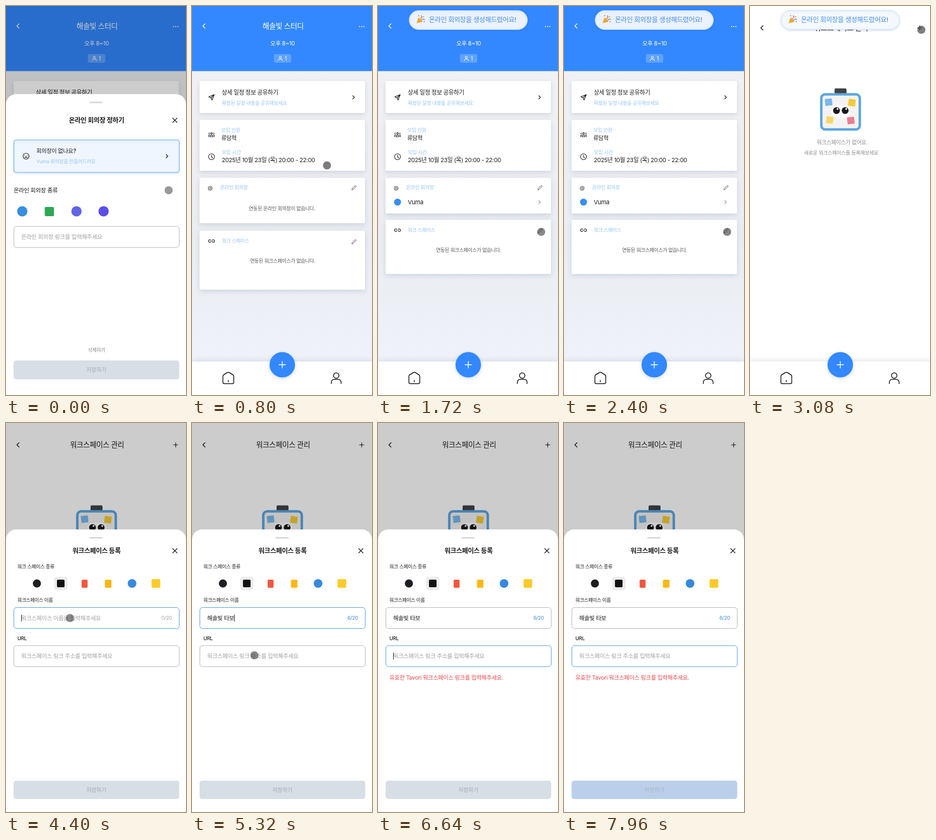
Recreate the animation shown at these times as an HTML page with a canvas. Size 332 by 720 pixels, loop 8 s.

```html
<!DOCTYPE html>
<html lang="ko">
<head>
<meta charset="utf-8">
<style>
html, body { margin: 0; width: 100%; height: 100%; overflow: hidden; background: #fff; }
canvas { display: block; width: 332px; height: 720px; }
</style>
</head>
<body>
<canvas id="stage"></canvas>
<script>
const W = 332, H = 720, LOOP = 8000;
const FONT = 'Inter, "Noto Sans CJK KR", "Noto Sans CJK", sans-serif';
const BLUE = '#3388ff', INK = '#1c1c1e', PALE = '#94c4f4', HINT = '#a0a0a4';
const ROOM = 'Vuma', TOOL = 'Tavori';
const TYPED = ['', 'ㅎ', '하', '해', '해ㅅ', '해소', '해솔', '해솔ㅂ', '해솔비', '해솔빛',
  '해솔빛 ', '해솔빛 ㅌ', '해솔빛 타', '해솔빛 타ㅂ', '해솔빛 타보'];

const stage = document.getElementById('stage');
const ratio = window.devicePixelRatio || 1;
stage.width = W * ratio;
stage.height = H * ratio;
const ctx = stage.getContext('2d');

const clamp = v => Math.max(0, Math.min(1, v));
const span = (t, a, b) => clamp((t - a) / (b - a));
const ease = p => p * p * (3 - 2 * p);
const easeOut = p => 1 - Math.pow(1 - p, 3);
const mix = (a, b, p) => a + (b - a) * p;
const blend = (a, b, p) => `rgb(${a.map((v, i) => Math.round(mix(v, b[i], p)))})`;

function text(str, x, y, size, color = INK, weight = 400, align = 'left') {
  ctx.font = `${weight} ${size}px ${FONT}`;
  ctx.letterSpacing = `${-0.03 * size}px`;
  ctx.textAlign = align;
  ctx.textBaseline = 'alphabetic';
  ctx.fillStyle = color;
  ctx.fillText(str, x, y + size * 0.37);
}

function box(x, y, w, h, r, fill, stroke, line = 1) {
  ctx.beginPath();
  ctx.roundRect(x, y, w, h, r);
  if (fill) { ctx.fillStyle = fill; ctx.fill(); }
  if (stroke) { ctx.strokeStyle = stroke; ctx.lineWidth = line; ctx.stroke(); }
}

function dot(x, y, r, fill) {
  ctx.beginPath();
  ctx.arc(x, y, r, 0, Math.PI * 2);
  ctx.fillStyle = fill;
  ctx.fill();
}

function shadowed(color, blur, dy, draw) {
  ctx.save();
  ctx.shadowColor = color;
  ctx.shadowBlur = blur * ratio;
  ctx.shadowOffsetY = dy * ratio;
  draw();
  ctx.restore();
}

// Line icons are drawn around their own centre.
function icon(path, x, y, color = INK, line = 1.2) {
  ctx.save();
  ctx.translate(x, y);
  ctx.strokeStyle = color;
  ctx.lineWidth = line;
  ctx.lineCap = ctx.lineJoin = 'round';
  ctx.stroke(new Path2D(path));
  ctx.restore();
}

const ICON = {
  back: 'M2 -4L-2 0L2 4',
  next: 'M-1.5 -3L1.5 0L-1.5 3',
  close: 'M-4 -4L4 4M4 -4L-4 4',
  plus: 'M-4 0H4M0 -4V4',
  send: 'M5 -5L-5 -1L-1 1L1 5ZM5 -5L-1 1',
  clock: 'M5.5 0A5.5 5.5 0 1 1 -5.5 0A5.5 5.5 0 1 1 5.5 0M0 -3V0.5L2.5 2',
  people: 'M-1.6 -2A1.6 1.6 0 1 1 1.6 -2A1.6 1.6 0 1 1 -1.6 -2M-3 4V3Q-3 1.2 0 1.2T3 3V4ZM-4 0.5Q-5.5 1 -5.5 3V4M4 0.5Q5.5 1 5.5 3V4M-4 -3.2A1.2 1.2 0 0 0 -4 -1M4 -3.2A1.2 1.2 0 0 1 4 -1',
  pencil: 'M-4 4L-3.4 1.6L2.4 -4L4 -2.4L-1.6 3.4Z',
  link: 'M-1.5 -2.5H-3A2.5 2.5 0 0 0 -3 2.5H-1.5M1.5 -2.5H3A2.5 2.5 0 0 1 3 2.5H1.5M-2.5 0H2.5',
  face: 'M5.5 0A5.5 5.5 0 1 1 -5.5 0A5.5 5.5 0 1 1 5.5 0M-2 -1.6V-1.2M2 -1.6V-1.2M-2.3 2.6Q0 0.4 2.3 2.6',
  home: 'M-10 -3.5Q-10 -5 -9 -6L-2 -10.5Q0 -11.5 2 -10.5L9 -6Q10 -5 10 -3.5V7.5Q10 10 7.5 10H-7.5Q-10 10 -10 7.5ZM0 4V6.5',
  user: 'M-5 -5A5 5 0 1 1 5 -5A5 5 0 1 1 -5 -5M-9 10V8Q-9 2 -3 2H3Q9 2 9 8V10',
  person: 'M-2 -2A2 2 0 1 1 2 -2A2 2 0 1 1 -2 -2M-4 4Q-4 1 0 1T4 4'
};

function card(y, h) {
  shadowed('rgba(60,75,105,.17)', 8, 3, () => box(14, y, 305, h, 2, '#fff'));
}

function more(x, y) {
  for (const d of [-4, 0, 4]) dot(x + d, y, 1, '#fff');
}

function navBar() {
  shadowed('rgba(60,70,90,.14)', 10, -2, () => box(0, 658, W, 62, 0, '#fff'));
  shadowed('rgba(40,100,220,.25)', 7, 2, () => dot(166.5, 664, 23.5, BLUE));
  icon('M-6 0H6M0 -6V6', 166.5, 664, '#fff', 1.5);
  icon(ICON.home, 67, 689, INK, 1.5);
  icon(ICON.user, 266, 689, INK, 1.5);
}

function schedulePage(made) {
  const bg = ctx.createLinearGradient(0, 120, 0, 658);
  bg.addColorStop(0, '#f0f1f4');
  bg.addColorStop(0.6, '#e9ecf1');
  bg.addColorStop(1, '#eff2f8');
  box(0, 0, W, H, 0, bg);
  box(0, 0, W, 120.5, 0, BLUE);
  icon(ICON.back, 22, 37, '#fff', 1.4);
  more(313, 38);
  text('해솔빛 스터디', 168, 37, 13.6, '#fff', 500, 'center');
  text('오후 8~10', 167, 69, 10.7, '#fff', 400, 'center');
  box(151, 89, 32, 16, 3, 'rgba(255,255,255,.22)');
  icon(ICON.person, 163, 97, '#fff', 1);
  text('1', 171, 97, 10, '#fff');

  card(139, 59);
  icon(ICON.send, 36, 169);
  text('상세 일정 정보 공유하기', 55, 160, 10.8, INK, 500);
  text('확정된 일정 내용을 공유해보세요', 55, 180, 9.1, PALE);
  icon(ICON.next, 298, 169);

  card(211, 94);
  icon(ICON.people, 36, 238, INK, 1.1);
  text('모임 인원', 54, 230, 9.2, PALE);
  text('류담혁', 54, 244, 10.5);
  icon(ICON.clock, 36, 279, INK, 1.1);
  text('모임 시간', 55, 271, 9.2, PALE);
  text('2025년 10월 23일 (목) 20:00 - 22:00', 55, 285, 10.8);

  card(318, made ? 66 : 84);
  text('@', 29, 336, 9.5);
  text('온라인 회의장', 52, 336, 9.1, PALE);
  icon(ICON.pencil, 299, 336, '#555', 1);
  if (made) {
    dot(36, 363, 6.5, '#3a8ef0');
    text(ROOM, 55, 363, 11);
    icon(ICON.next, 298, 363, '#555', 1);
  } else {
    text('연동된 온라인 회의장이 없습니다.', 166, 375, 9.1, '#55575c', 400, 'center');
  }

  const y = made ? 396 : 416;
  card(y, made ? 100 : 109);
  icon(ICON.link, 36, y + 19, INK, 1.1);
  text('워크 스페이스', 55, y + 19, 9, PALE);
  icon(ICON.pencil, 299, y + 20, '#555', 1);
  text('연동된 워크스페이스가 없습니다.', 167, y + 56, 9.1, '#55575c', 400, 'center');
  navBar();
}

function note(x, y, turn, fill) {
  ctx.save();
  ctx.translate(x, y);
  ctx.rotate(turn);
  box(-6.5, -6.5, 13, 13, 1, fill);
  ctx.restore();
}

function mascot() {
  box(156, 152.5, 22, 12, 2, '#3f4246');
  box(131.5, 163.5, 71, 65, 7, '#f3f3f4', '#5ba5df', 4.5);
  note(145, 178, -0.12, '#79b9ec');
  note(188, 179, 0.15, '#f5cb35');
  note(147, 211, 0.12, '#f8d766');
  note(186, 212, -0.12, '#ee7d90');
  box(150, 184, 35, 23, 11, '#fff');
  for (const x of [159.5, 175.5]) {
    dot(x, 193.5, 6.3, '#17181a');
    dot(x + 2, 190.5, 1.7, '#fff');
  }
}

function spacePage() {
  box(0, 0, W, H, 0, '#fff');
  icon(ICON.back, 22, 40.5, INK, 1.5);
  text('워크스페이스 관리', 168, 40, 13.5, INK, 500, 'center');
  icon(ICON.plus, 313, 40.5, INK, 1.2);
  mascot();
  text('워크스페이스가 없어요.', 170, 252, 10, '#8a8d92', 400, 'center');
  text('새로운 워크스페이스를 등록해보세요', 168, 272, 9.3, '#8a8d92', 400, 'center');
  navBar();
}

function sheet(top, title, p, body) {
  box(0, 0, W, H, 0, `rgba(0,0,0,${0.2 * p})`);
  ctx.save();
  ctx.translate(0, (H - top) * (1 - p));
  box(0, top, W, H - top + 30, [19, 19, 0, 0], '#fff');
  box(153.5, top + 14, 25, 3, 1.5, '#dadada');
  text(title, 167, top + (top < 180 ? 48.5 : 40), 12.1, INK, 600, 'center');
  icon(ICON.close, 311.5, top + (top < 180 ? 48.5 : 39.5), INK, 1.3);
  body();
  ctx.restore();
}

function saveButton(y, h, p) {
  box(14, y, 305.5, h, 5, blend([216, 222, 230], [51, 136, 255], p));
  text('저장하기', 166.5, y + h / 2, 10.4, blend([163, 170, 180], [210, 225, 250], p), 400, 'center');
}

function field(y, value, hint, focus) {
  box(14.5, y, 305, 39, 5, '#fff', focus ? '#559fdf' : '#b4b6bb');
  text(value || hint, 28, y + 19.5, 10.6, value ? INK : HINT);
}

function roomSheet() {
  shadowed('rgba(50,130,230,.22)', 5, 1, () => box(14.5, 248, 305, 60, 4, '#f0f6ff', '#64abee'));
  icon(ICON.face, 37, 278);
  text('회의장이 없나요?', 56, 268, 10.5, INK, 500);
  text(ROOM + ' 회의장을 만들어드려요', 56, 288, 9.1, PALE);
  icon(ICON.next, 297, 278, INK, 1.4);
  text('온라인 회의장 종류', 14, 341, 10.7, INK, 500);
  dot(30, 380, 9.5, '#368ee0');
  box(71.5, 372, 17, 17, 2, '#2ca853');
  dot(130, 380, 9.5, '#6065e4');
  dot(180, 380, 9.5, '#5b4fe8');
  field(408, '', '온라인 회의장 링크를 입력해주세요', false);
  text('삭제하기', 167, 637, 9, '#85888e', 400, 'center');
  saveButton(656, 35, 0);
}

function spaceSheet(t) {
  const name = TYPED[Math.floor(span(t, 4480, 5180) * (TYPED.length - 1))];
  const inName = t >= 4400 && t < 5400, inUrl = t >= 5400;
  text('워크 스페이스 종류', 21, 266, 9, INK, 500);
  if (t >= 3900) box(88.5, 284.5, 25, 25, 5, '#ececee');
  dot(57, 297, 7.5, '#1c1f24');
  box(94, 290, 14, 14, 2, '#111');
  box(139.5, 290, 11, 15, 2, '#f2583e');
  box(182.5, 290, 12, 15, 2, '#f9b912');
  dot(232.5, 297, 8, '#3689dc');
  box(268.5, 289, 16, 16, 2, '#fccb2b');
  text('워크스페이스 이름', 21, 328, 8.9, INK, 500);
  field(341.5, name, '워크스페이스 이름을 입력해주세요', inName);
  text(name.length + '/20', 306, 361, 9.2, name ? '#3c8ddc' : HINT, 400, 'right');
  const caret = (x, y) => box(x, y - 6.5, 1, 13, 0, '#222');
  if (inName && (t > 4480 || t < 4440)) {
    ctx.font = `400 10.6px ${FONT}`;
    ctx.letterSpacing = '-0.318px';
    caret(28 + ctx.measureText(name).width, 361);
  }
  text('URL', 21, 399, 9.2, INK, 500);
  field(412, '', '워크스페이스 링크 주소를 입력해주세요', inUrl);
  if (inUrl && t < 7900 && (t - 5400) % 1000 < 500) caret(28, 431.5);
  if (t >= 5760) text(`유효한 ${TOOL} 워크스페이스 링크를 입력해주세요.`, 21, 471, 10.5, '#e5484d');
  saveButton(662, 34, span(t, 7940, 8060));
}

function popper(x, y) {
  ctx.beginPath();
  ctx.moveTo(x - 7, y + 7);
  ctx.lineTo(x - 3, y - 4);
  ctx.quadraticCurveTo(x + 3, y - 1, x + 4, y + 4);
  ctx.closePath();
  ctx.fillStyle = '#f4b537';
  ctx.fill();
  icon('M-5 2L-1 5M-4 -1L2 4', x, y, '#d97a33', 1);
  icon('M1 -2Q4 -4 2 -7', x, y, '#e0566c', 1.4);
  icon('M3 1Q5 -2 8 0', x, y, '#4b9be8', 1.4);
  dot(x + 6, y - 5, 1.3, '#e9a43b');
  dot(x - 3, y - 7, 1.1, '#58b26b');
  dot(x + 7, y + 4, 1.1, '#e0566c');
}

function toast(t) {
  const p = easeOut(span(t, 1280, 1560)) - ease(span(t, 3110, 3300));
  if (p <= 0) return;
  ctx.save();
  ctx.translate(0, -55 * (1 - p));
  shadowed('rgba(40,90,170,.2)', 4, 1, () =>
    box(57.5, 8.5, 218, 35, 17.5, t < 2480 ? '#ebf2fd' : '#f5f9ff', '#d3e4fa'));
  popper(78, 25);
  text('온라인 회의장을 생성해드렸어요!', 94, 25.5, 12.2, '#428ee8', 500);
  ctx.restore();
}

// time, x, y, opacity
const TRACK = [
  [0, 300, 341, .52], [80, 300, 341, .52], [480, 249, 295, .6], [880, 249, 295, .68],
  [1080, 249, 295, .55], [1280, 252, 300, .55], [1680, 301, 418, .6], [2280, 301, 418, .68],
  [2520, 301, 418, .55], [2960, 316, 44, .6], [3120, 316, 44, .68], [3520, 136, 352, .55],
  [3800, 101, 298, .6], [3960, 101, 298, .68], [4300, 118, 361, .6], [4480, 118, 361, .6],
  [4960, 118, 361, .55], [5260, 115, 430, .62], [5660, 115, 430, .62], [5860, 115, 430, 0]
];

function pointer(t) {
  let i = TRACK.length - 1;
  while (TRACK[i][0] > t) i--;
  const a = TRACK[i], b = TRACK[i + 1] || a;
  const p = b === a ? 0 : ease(span(t, a[0], b[0]));
  const [, x, y, alpha] = a.map((v, k) => mix(v, b[k], p));
  if (alpha > 0) dot(x, y, 7.5, `rgba(60,60,62,${alpha})`);
}

function draw(t) {
  ctx.setTransform(ratio, 0, 0, ratio, 0, 0);
  ctx.clearRect(0, 0, W, H);
  if (t < 2480) schedulePage(t >= 1300);
  else spacePage();
  const closing = 1 - ease(span(t, 540, 760));
  if (closing > 0) sheet(163, '온라인 회의장 정하기', closing, roomSheet);
  const opening = easeOut(span(t, 3140, 3440));
  if (opening > 0) sheet(197, '워크스페이스 등록', opening, () => spaceSheet(t));
  toast(t);
  pointer(t);
}

const start = performance.now();
function tick() {
  draw((performance.now() - start) % LOOP);
  requestAnimationFrame(tick);
}
tick();
</script>
</body>
</html>
```
